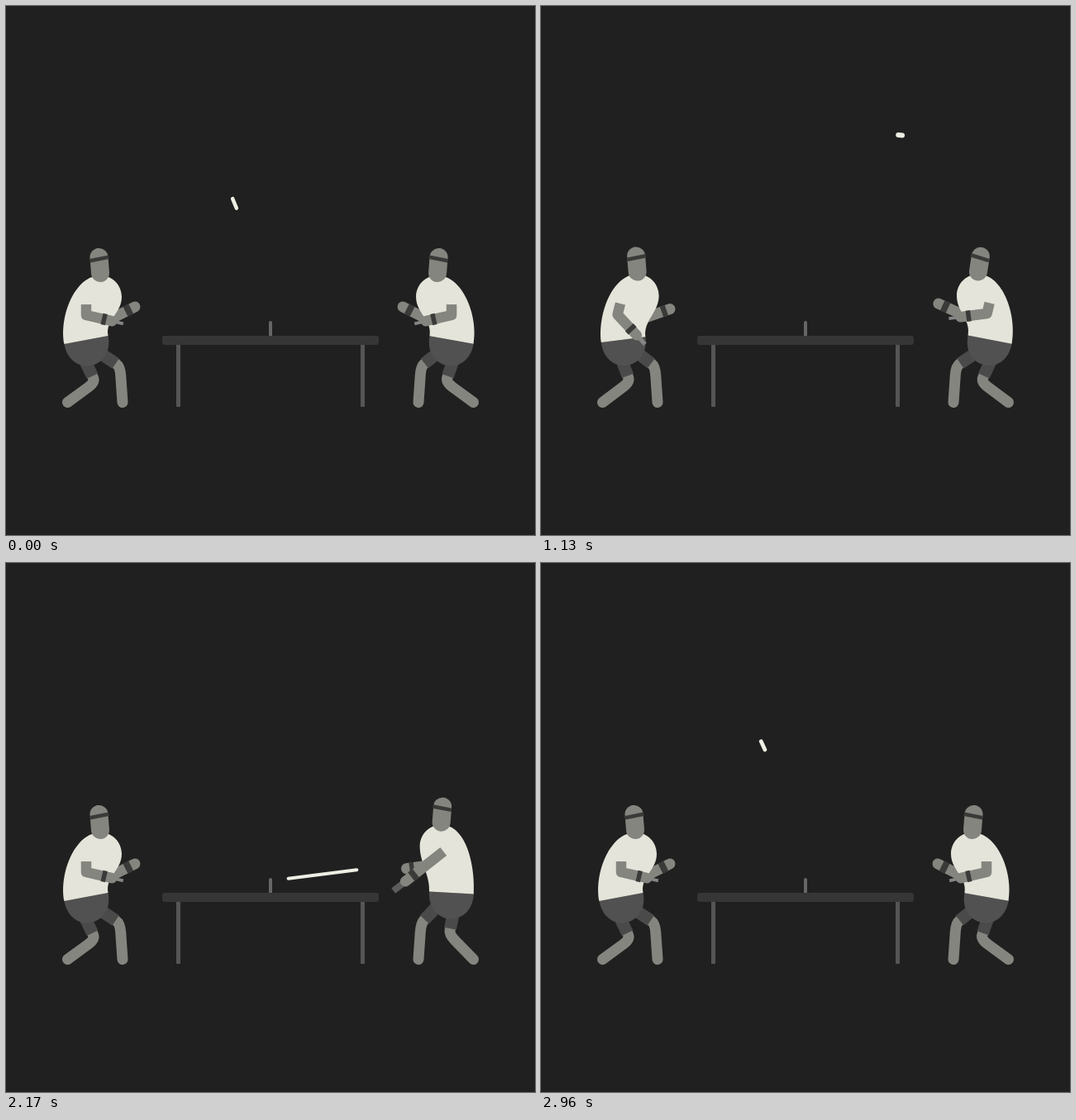
These frames come from a looping animation (640 by 640 pixels, 3 s). An HTML page with a canvas:

```html
<!DOCTYPE html>
<html lang="en">
<head>
<meta charset="utf-8">
<title>Table tennis rally</title>
<style>
html, body { margin: 0; width: 100%; height: 100%; overflow: hidden; background: #202020; }
canvas { display: block; }
</style>
</head>
<body>
<canvas id="stage" width="640" height="640"></canvas>
<script>
const ctx = document.getElementById('stage').getContext('2d');
const FPS = 24, FRAMES = 72, HALF = 36, GRAVITY = 1.1;
const SKIN = '#85857f', SHIRT = '#e4e4da', SHORTS = '#515151', THIGH = '#4a4a4a', BAND = '#3a3a39';

// Poses: waist x y, lean, chest x y, far elbow x y, far hand x y
const READY = [97, 404, -10.5, 114, 352, 122, 381, 156, 364];
const WINDUP = [104, 392, 2, 109, 331, 132, 350, 156, 374];
const FOLLOW = [102, 403, -2, 119, 348, 132, 370, 154, 371];
const SETTLE = [101, 404, -10, 118, 352, 126, 381, 160, 364];
const LOB = [96.5, 402, -13, 95, 342, 140, 347, 176, 339];

// Ball contacts in half a loop: frame, x, y
const RALLY = [
  [5.5, 320, 377], [11, 219, 396], [12, 196, 363], [15.5, 188, 368],
  [17, 395, 395], [18, 496, 320], [20, 490, 215]
];
const shifted = (path, frames, flip) => path.map(([f, x, y]) => [f + frames, flip ? 640 - x : x, y]);
const PATH = [...RALLY, ...shifted(RALLY, HALF, true), ...shifted(RALLY.slice(0, 1), FRAMES)];

const wrap = f => (f % FRAMES + FRAMES) % FRAMES;
const mix = (p, q, u) => [p[0] + (q[0] - p[0]) * u, p[1] + (q[1] - p[1]) * u];
const progress = (f, from, to) => Math.min(1, Math.max(0, (f - from) / (to - from)));

function ease(f, from, to) {
  const u = progress(f, from, to);
  return u * u * (3 - 2 * u);
}

const bump = (f, from, peak, to) => ease(f, from, peak) * (1 - ease(f, peak, to));

// Point at a distance along an angle in degrees, counter-clockwise
function polar(p, deg, r) {
  const a = deg * Math.PI / 180;
  return [p[0] + r * Math.cos(a), p[1] - r * Math.sin(a)];
}

function motion(f) {
  const windup = bump(f, 9, 12, 19), lob = bump(f, 55, 57, 65);
  const straight = ease(f, 7, 11) * (1 - ease(f, 21, 30));
  const layers = [
    [WINDUP, windup], [FOLLOW, bump(f, 14, 20, 32)],
    [SETTLE, bump(f, 24, 35, 49)], [LOB, lob]
  ];
  const body = READY.map((v, i) => layers.reduce((sum, [p, w]) => sum + w * (p[i] - v), v));
  // The racket arm windmills twice, slowing down
  const turn = 1 - (1 - progress(f, 8.6, 30)) ** 2;
  return {
    body,
    look: bump(f, 53, 56.5, 65),
    angle: -90 + 720 * turn + 87 * lob,
    bend: 77 * (1 - straight) - 52 * lob,
    reach: 1 + straight * (.25 + .14 * windup) + .08 * lob,
    straight
  };
}

function ballAt(f) {
  f = wrap(f);
  if (f < PATH[0][0]) f += FRAMES;
  const i = PATH.findIndex(p => p[0] > f);
  const [f0, x0, y0] = PATH[i - 1], [f1, x1, y1] = PATH[i];
  const u = progress(f, f0, f1);
  return [x0 + (x1 - x0) * u, y0 + (y1 - y0) * u - GRAVITY * (f - f0) * (f1 - f)];
}

function line(points, width, color, cap = 'round') {
  ctx.beginPath();
  points.forEach(p => ctx.lineTo(...p));
  ctx.lineWidth = width;
  ctx.lineCap = cap;
  ctx.lineJoin = 'round';
  ctx.strokeStyle = color;
  ctx.stroke();
}

function box(x, y, w, h, r, color) {
  ctx.beginPath();
  ctx.roundRect(x, y, w, h, r);
  ctx.fillStyle = color;
  ctx.fill();
}

function leg(hip, knee, foot, cover) {
  ctx.beginPath();
  ctx.moveTo(...hip);
  ctx.lineTo(...mix(hip, knee, .8));
  ctx.quadraticCurveTo(...knee, ...mix(knee, foot, .25));
  ctx.lineTo(...foot);
  ctx.lineWidth = 13;
  ctx.lineCap = 'round';
  ctx.strokeStyle = SKIN;
  ctx.stroke();
  line([hip, mix(hip, knee, cover)], 15, THIGH, 'butt');
}

function farArm(chest, elbow, hand) {
  line([chest, elbow, hand], 13, SKIN);
  line([mix(hand, elbow, .14), mix(hand, elbow, .34)], 13.5, BAND, 'butt');
  line([chest, mix(chest, elbow, .75)], 14, SHIRT, 'butt');
}

function nearArm(shoulder, { angle, bend, reach, straight }) {
  const elbow = polar(shoulder, angle, 27 * reach);
  const along = r => polar(elbow, angle + bend, r * reach);
  const sleeve = mix(shoulder, elbow, .52);
  line([along(33), along(46)], 4 + 4 * straight, straight > .5 ? '#5c5c5c' : '#858585', 'butt');
  line([sleeve, elbow, along(32)], 12.5, SKIN);
  line([along(19.5), along(25)], 13.5, BAND, 'butt');
  line([shoulder, sleeve], 14, SHIRT, 'butt');
}

function head(neck, look) {
  const skull = mix([neck[0] - 1.5, neck[1] - 19], [neck[0] - 11, neck[1] - 16.5], look);
  line([neck, skull], 22, SKIN);
  const mid = [skull[0] + .5 + look * 2, skull[1] + 2 - look];
  const angle = 11 + 45 * look;
  line([polar(mid, angle, -11.5), polar(mid, angle, 11.5)], 4.5, BAND, 'butt');
}

function torso(left, right, lean, [cx, cy]) {
  const up = 90 - lean, top = cy - 26, front = cx + 26;
  ctx.beginPath();
  ctx.moveTo(...left);
  ctx.bezierCurveTo(...polar(left, up, 35), cx - 30, top, cx, top);
  ctx.bezierCurveTo(cx + 15, top, front, cy - 14, front, cy);
  ctx.bezierCurveTo(front, cy + 20, ...polar(right, up, 20), ...right);
  ctx.fillStyle = SHIRT;
  ctx.fill();
}

function shorts(left, right, lean) {
  const down = -90 - lean;
  ctx.beginPath();
  ctx.moveTo(...left);
  ctx.bezierCurveTo(...polar(left, down, 42), ...polar(right, down, 42), ...right);
  ctx.fillStyle = SHORTS;
  ctx.fill();
}

function player(f) {
  const move = motion(f);
  const [wx, wy, lean, cx, cy, ex, ey, hx, hy] = move.body;
  const waist = [wx, wy], chest = [cx, cy], lift = 404 - wy;
  const left = polar(waist, -lean, -27), right = polar(waist, -lean, 27);
  farArm(chest, [ex, ey], [hx, hy]);
  leg([wx - 3, wy + 22], [108 - lift * .8, 455 - lift * 1.15], [74.5, 479.5], .75);
  leg([wx + 17, wy + 16], [138, 436], [141, 479.5], .78);
  shorts(left, right, lean);
  torso(left, right, lean, chest);
  head([cx, cy - 29], move.look);
  nearArm([cx - 17, cy - 5], move);
}

function table() {
  box(206, 408, 5, 77, 1, '#555');
  box(429, 408, 5, 77, 1, '#555');
  box(318, 381, 4, 20, 2, '#666');
  box(189, 399, 262, 11, 3, '#363636');
}

function ball(f) {
  const p = ballAt(f - .3), q = ballAt(f + .3);
  const blur = Math.hypot(q[0] - p[0], q[1] - p[1]);
  line([p, q], Math.max(4, 7 - blur / 5), '#eeeee4');
}

function draw(now) {
  const f = Math.floor((now % 3000 + 4) * FPS / 1000) % FRAMES;
  ctx.fillStyle = '#202020';
  ctx.fillRect(0, 0, 640, 640);
  table();
  player(f);
  ctx.save();
  ctx.translate(640, 0);
  ctx.scale(-1, 1);
  player(wrap(f - HALF));
  ctx.restore();
  ball(f);
}

const start = performance.now();
function tick() {
  draw(performance.now() - start);
  requestAnimationFrame(tick);
}
tick();
</script>
</body>
</html>
```
